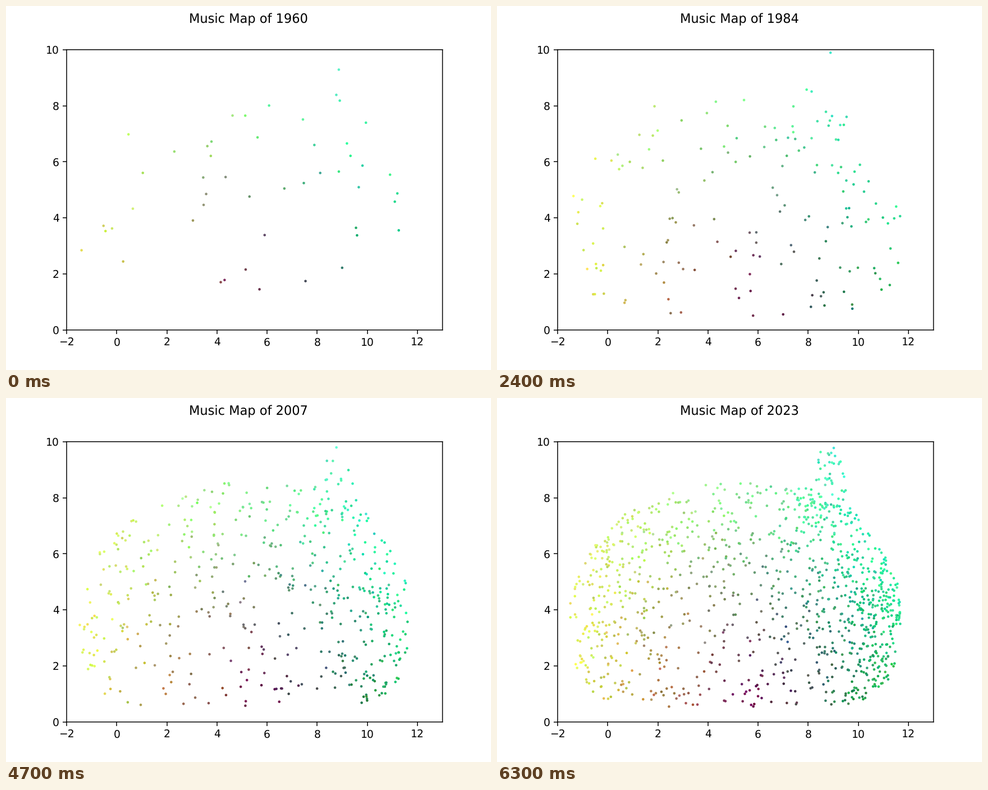
Animation of 864x648 px, one loop 6.4 s. Source, as a matplotlib script:

```python
import numpy as np
import matplotlib.pyplot as plt
from matplotlib.animation import FuncAnimation

plt.rcParams["text.hinting"] = "none"

FIRST_YEAR, LAST_YEAR = 1960, 2023
MID_X, HALF_WIDTH = 5.1, 6.6
DARK_SPOT = (5.8, 0.7)
HOT_SPOTS = [(8.4, 7.4), (5.8, 1.1), (3.6, 6.0), (6.9, 6.6), (10.9, 4.4), (10.4, 1.0)]


def outline(u, x):
    """Lower and upper edge of the cloud, with a narrow peak on the right."""
    low = 4 - 3.5 * np.cbrt(1 - u ** 6)
    peak = 2.3 * np.exp(-((x - 8.9) / 0.75) ** 2)
    high = 4 + 4.6 * np.sqrt(1 - u ** 2) + peak
    return low, high


def density(u, v, x, y, crowding):
    """Even at first, later crowded to the sides, the top and the hot spots."""
    rim = u ** 2 * np.where(u > 0, 8, 3) + 1.5 * v ** 2
    spots = sum(np.exp(-((x - a) ** 2 + (y - b) ** 2) / 0.5) for a, b in HOT_SPOTS)
    return 1 + crowding * (rim + 3 * spots)


def points_in(year, rng):
    age = year - FIRST_YEAR
    count = round(49 * np.exp(0.05 * age))
    u = rng.uniform(-1, 1, 12 * count)
    x = MID_X + HALF_WIDTH * u
    y = rng.uniform(0.4, 10.2, u.size)
    low, high = outline(u, x)
    inside = (y > low) & (y < high)
    v = (y - low) / (high - low)
    crowding = 0.2 + 0.8 * age / (LAST_YEAR - FIRST_YEAR)
    weight = inside * density(u, v, x, y, crowding)
    pick = rng.choice(u.size, count, replace=False, p=weight / weight.sum())
    return x[pick], y[pick]


def colors_at(x, y, rng):
    """Red fades to the right, green away from the dark spot, blue grows upward."""
    red = np.maximum(205 - 17 * x, 35) + 7 * np.maximum(y - 6, 0)
    green = np.minimum(8 + 33 * np.hypot(x - DARK_SPOT[0], y - DARK_SPOT[1]), 238)
    blue = 70 + y * (6 + 0.09 * x ** 2)
    rgb = np.column_stack([red, green, blue])
    rgb += rng.normal(0, 14, rgb.shape)
    return np.clip(rgb / 255, 0, 1)


fig, ax = plt.subplots(figsize=(6.4, 4.8), dpi=135)
title = fig.suptitle("")
ax.set_xlim(-2, 13)
ax.set_ylim(0, 10)
for spine in ax.spines.values():
    spine.set_snap(False)
dots = ax.scatter([], [], s=2)


def draw(frame):
    year = FIRST_YEAR + frame
    rng = np.random.default_rng(year)
    x, y = points_in(year, rng)
    dots.set_offsets(np.column_stack([x, y]))
    dots.set_color(colors_at(x, y, rng))
    title.set_text(f"Music Map of {year}")
    return dots, title


anim = FuncAnimation(fig, draw, frames=LAST_YEAR - FIRST_YEAR + 1,
                     interval=100, repeat=True, repeat_delay=0)
plt.show()
```
